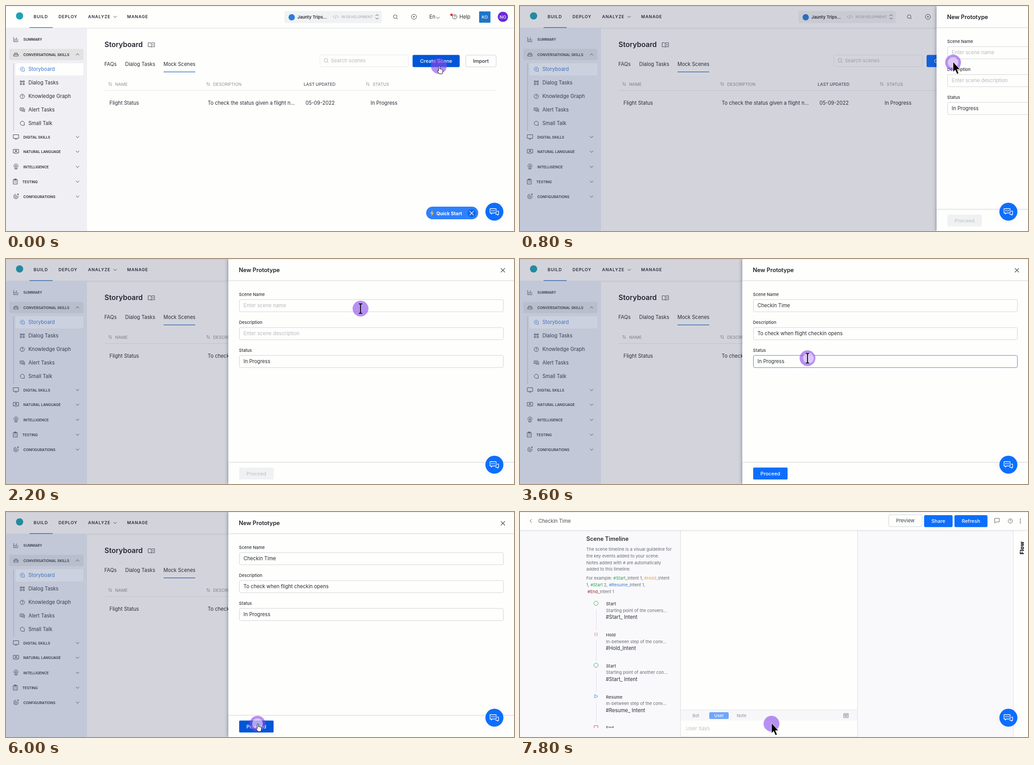
Animation, 1122 px wide and 499 px high, one loop 8 s. Source, as an HTML page with a canvas:

```html
<!DOCTYPE html>
<html lang="en">
<head>
<meta charset="utf-8">
<title>New scene</title>
<style>
html, body { margin: 0; width: 100%; height: 100%; overflow: hidden; background: #fefefd; }
canvas { display: block; width: 1122px; height: 499px; }
</style>
</head>
<body>
<canvas id="stage" width="1122" height="499"></canvas>
<script>
const c = document.getElementById('stage').getContext('2d');
const W = 1122, H = 499, LOOP = 8000, STEP = 200;
const WHITE = '#fefefd', INK = '#2a2d33', BLUE = '#0d6efd', DEEP = '#0056d8', GREY = '#8c9098', HINT = '#b6b9be';

// y is the middle of the capital letters
function text(s, x, y, size = 11.05, color = INK, weight = 400, gap = 0, font = 'Inter') {
  c.font = `${weight} ${size}px "${font}", sans-serif`;
  c.letterSpacing = gap + 'px';
  c.fillStyle = color;
  c.fillText(s, x, y + size * 0.364);
  return x + c.measureText(s).width;
}

function middle(s, x, y, size, color, weight) {
  c.textAlign = 'center';
  text(s, x, y, size, color, weight);
  c.textAlign = 'left';
}

function rect(x, y, w, h, color) {
  c.fillStyle = color;
  c.fillRect(x, y, w, h);
}

function box(x, y, w, h, r, fill, line) {
  c.beginPath();
  c.roundRect(x, y, w, h, r);
  if (fill) { c.fillStyle = fill; c.fill(); }
  if (line) { c.strokeStyle = line; c.lineWidth = 1; c.stroke(); }
}

function disc(x, y, r, fill, line) {
  c.beginPath();
  c.arc(x, y, r, 0, Math.PI * 2);
  if (fill) { c.fillStyle = fill; c.fill(); }
  if (line) { c.strokeStyle = line; c.lineWidth = 1; c.stroke(); }
}

function icon(d, x, y, color = '#3c4048', width = 1, fill) {
  const p = new Path2D(d);
  c.save();
  c.translate(x, y);
  c.lineJoin = 'round';
  if (fill) { c.fillStyle = fill; c.fill(p); }
  if (width) { c.strokeStyle = color; c.lineWidth = width; c.stroke(p); }
  c.restore();
}

function shadowed(blur, dx, dy, alpha, draw) {
  c.save();
  c.shadowColor = `rgba(30,40,70,${alpha})`;
  c.shadowBlur = blur;
  c.shadowOffsetX = dx;
  c.shadowOffsetY = dy;
  draw();
  c.restore();
}

const DOWN = 'M-3.5-1.8L0 1.8 3.5-1.8', UP = 'M-3.5 1.8L0-1.8 3.5 1.8';
const LENS = 'M3.5-.5A4 4 0 1 1-4.5-.5 4 4 0 1 1 3.5-.5M2.4 2.4L5 5';
const BUBBLE = 'M4.5 4.5H0A4.5 4.5 0 1 1 4.5 0Z';
const SORT = 'M-2 3.5V-3.5M-3.8-1.7L-2-3.5-.2-1.7M2-3.5V3.5M.2 1.7L2 3.5 3.8 1.7';
const CROSS = 'M-4.5-4.5L4.5 4.5M4.5-4.5L-4.5 4.5';
const ARROW = 'M0-1.5V21L4.8 16.6 8.8 25.6 12.4 24 8.5 15.2H15Z';
const BEAM = 'M-3.5-10.5H-1L0-9.5 1-10.5H3.5M0-9.5V9.5M-3.5 10.5H-1L0 9.5 1 10.5H3.5';
const HAND = 'M-.5 11V1.5C-.5-.5 2.2-.5 2.2 1.5V7C3 5.6 4.6 6 4.6 7.4 5.4 6.4 6.4 7 6.4 8 ' +
  '7.4 7.2 8.6 7.8 8.6 9.2 9 13 7.8 15 7.4 17.5H1C0 15-3 12.5-3 10.5-2.5 9-1.5 10-.5 11Z';

const sections = [
  ['SUMMARY', 74.5, 'M-5-5V5H5M-2 3V-1M1 3V-4M4 3V0'],
  ['CONVERSATIONAL SKILLS', 108, 'M-3-3H3V0H-3ZM-5 0H5V3.5H-5Z'],
  ['DIGITAL SKILLS', 291, 'M-6-5H6V3H-6ZM-2.5 5H2.5'],
  ['NATURAL LANGUAGE', 323.5, 'M-6-5H6V3H2L0 5-2 3H-6ZM-3 2.5C-3-.5 3-.5 3 2.5M1.5-2A1.5 1.5 0 1 1-1.5-2 1.5 1.5 0 1 1 1.5-2'],
  ['INTELLIGENCE', 357, 'M-2.5 5V2A4.5 4.5 0 1 1 2.5 2V5ZM1.5-1.5A1.5 1.5 0 1 1-1.5-1.5 1.5 1.5 0 1 1 1.5-1.5M0 0V4'],
  ['TESTING', 390, 'M-4.5-4.5H4.5V5.5H-4.5ZM-2-6H2V-3.5H-2ZM-2.5-1H-1M.5-1H2.5M-2.5 2H-1M.5 2H2.5'],
  ['CONFIGURATIONS', 423, 'M4-2L5 1 3 4 0 5-4 3.5-5 0-3.5-4 0-5M2 0A2 2 0 1 1-2 0 2 2 0 1 1 2 0M2-5H5.5M4-6.5L6-5 4-3.2']
];
const skills = [
  ['Storyboard', 140, BUBBLE + 'M-2-1H2M-2 1H1'],
  ['Dialog Tasks', 170, 'M-4.5-4H-1.5V-1H-4.5ZM1.5-4H4.5V-1H1.5ZM-4.5 1.5H-1.5V4.5H-4.5ZM1.5 1.5H4.5V4.5H1.5ZM-1.5-2.5H1.5'],
  ['Knowledge Graph', 200.4, 'M4.8 0A4.8 4.8 0 1 1-4.8 0 4.8 4.8 0 1 1 4.8 0M-1.3-1.2C-1.3-3 1.5-3 1.5-1.2 1.5 0 0 0 0 1.2M0 2.2V3'],
  ['Alert Tasks', 230, 'M-5-4H3V1H-2L-5 2ZM-2 3H2L5 4.5V-2M-3-1.5H1'],
  ['Small Talk', 260, BUBBLE]
];

function topBar() {
  shadowed(4, 0, 1, 0.14, () => rect(0, 0, W, 48, WHITE));
  rect(0, 0, W, 1, '#e7e8e8');
  disc(30, 22, 8, '#20a2b3');
  [['BUILD', 61], ['DEPLOY', 116], ['ANALYZE', 181.3], ['MANAGE', 267.5]]
    .forEach(([s, x]) => text(s, x, 23.5, 9.4, INK, 600, 0.8));
  icon(DOWN, 241, 24);
  rect(52, 47, 51, 1.5, '#3778c6');
  box(615, 11, 215, 27, 2, '#f1f2f4');
  disc(631, 25, 7, '#2b7ddd');
  text('Jaunty Trips...', 643.5, 24.5, 9.4, INK, 600);
  icon('M-3-3L-6 0-3 3M3-3L6 0 3 3M1-4L-1 4', 728.5, 24, '#a9adb5');
  text('IN DEVELOPMENT', 741, 24.5, 7.85, '#b4b8bf', 600);
  icon('M-3.5-2L0-5 3.5-2M-3.5 2L0 5 3.5 2', 819.5, 24);
  icon(LENS, 860, 24);
  disc(901, 24, 5.5, null, '#3c4048');
  disc(901, 24, 1.4, '#3c4048');
  text('En', 935, 24.4);
  icon(DOWN, 954, 26);
  icon(skills[2][2], 991, 24);
  disc(984, 19.5, 2.7, '#dc2f3e');
  text('Help', 1001.5, 24.4);
  box(1045, 12, 25, 25, 1, '#1f75c9');
  middle('KO', 1057.5, 24.5, 9.4, '#fff', 500);
  disc(1097.5, 24, 11.3, '#6c2bd9');
  middle('NO', 1097.5, 24.5, 9.4, '#fff', 500);
}

function sideBar() {
  rect(0, 49, 179, 450, '#f0f0f4');
  box(7, 95, 164, 25, 3, '#e2e2e3');
  rect(16, 127, 1.3, 150, '#c3c7d0');
  box(21, 127, 150, 27, 2, WHITE);
  sections.forEach(([s, y, d], i) => {
    icon(d, i === 5 ? 20.5 : 22, y - 0.5);
    text(s, i === 5 ? 36 : 38.3, y, 7.85, INK, 600);
    if (i) icon(i === 1 ? UP : DOWN, 158, y - 0.5);
  });
  skills.forEach(([s, y, d], i) => {
    const color = i ? INK : '#3673d2';
    icon(d, 36, y, color, 0.9);
    text(s, 49.4, y, 11.1, color);
  });
}

function sceneList(hover) {
  rect(0, 0, W, H, WHITE);
  topBar();
  sideBar();
  text('Storyboard', 217.5, 85, 15.6, '#202329', 600);
  icon('M0-3.5C-2-5-5-4.5-7-4.5V4.5C-5 4.5-2 4 0 5 2 4 5 4.5 7 4.5V-4.5C5-4.5 2-5 0-3.5ZM0-3.5V5M3.5-2V2', 321, 86);
  text('FAQs', 217.3, 129);
  text('Dialog Tasks', 263.2, 129);
  text('Mock Scenes', 347.7, 129);
  rect(348, 145.5, 70, 1.5, '#3c7cc9');
  box(693.5, 108.5, 195, 26, 3, WHITE, '#e4e6e9');
  icon(LENS, 707, 121, '#a8acb3');
  text('Search scenes', 717.5, 121, 11, HINT);
  box(898, 108.5, 104, 27, 3, hover ? DEEP : BLUE);
  middle('Create Scene', 950, 121.8, 11, '#fff', 500);
  box(1015.5, 109, 67, 26, 3, WHITE, '#d0d2d6');
  middle('Import', 1049, 121.8, 11, INK, 500);
  [['NAME', 230], ['DESCRIPTION', 446.5], ['STATUS', 799]].forEach(([s, x]) => {
    icon(SORT, x, 173, '#8d929a', 0.9);
    text(s, x + 11, 174, 9.4, GREY);
  });
  text('LAST UPDATED', 657.5, 174, 9.4, '#50545c', 500);
  rect(218, 187, 865, 1, '#e3e5e7');
  [['Flight Status', 228.6], ['To check the status given a flight n...', 445.4], ['05-09-2022', 661.4], ['In Progress', 805.2]]
    .forEach(([s, x]) => text(s, x, 215, 11.1));
  box(928, 445, 115, 28, 14, '#2f80fc');
  icon('M1-7L-4 1H-.5L-1.5 7 4-1.5H.5Z', 941, 459.5, '', 0, '#fbc02d');
  text('Quick Start', 950.5, 460, 10.4, '#fff', 700);
  disc(1028.5, 459.5, 9, '#0c67ea');
  icon(CROSS, 1028.5, 459.5, '#fff', 1.2);
}

function dim(k) {
  rect(0, 0, W, H, `rgba(40,45,80,${0.2 * k})`);
  rect(0, 49, 179, 450, `rgba(150,190,240,${0.12 * k})`);
}

function field(x, y, label, value, hint, focus) {
  text(label, x - 0.4, y - 24, 9.4, '#33363c', 500);
  box(x + 0.5, y - 13, 583, 27, 3, WHITE, focus ? '#4b82d4' : '#cfd2d6');
  text(value || hint, x + 9.6, y, 11.05, value ? INK : HINT);
}

function panel(x, s) {
  shadowed(7, -2, 0, 0.3, () => rect(x, 0, W - x + 10, H, WHITE));
  shadowed(3, 0, 1, 0.2, () => rect(x, 0, 640, 47, WHITE));
  shadowed(3, 0, -1, 0.2, () => rect(x, 452, 640, 47, WHITE));
  rect(x, 0, 640, 1, '#e7e8e8');
  text('New Prototype', x + 23.3, 24, 12.6, '#202329', 600);
  icon(CROSS, x + 606.5, 25, '#44484f', 1.1);
  const left = x + 24;
  field(left, 103, 'Scene Name', s.name, 'Enter scene name', s.focus === 1);
  field(left, 165, 'Description', s.about, 'Enter scene description', s.focus === 2);
  field(left, 226.8, 'Status', 'In Progress', '', s.focus === 3);
  box(left, 462.5, 76, 26.5, 2, s.about ? (s.hover ? DEEP : BLUE) : '#f0f1f2');
  middle('Proceed', left + 38, 476, 11, s.about ? '#fff' : '#c3c6cb', 500);
}

function blank(status) {
  box(0.5, 0.5, W - 1, H + 6, 3, WHITE, '#bfbfbf');
  if (!status) return;
  box(0, 480, 373, 19, [0, 3, 0, 0], '#4a4a48');
  text('Waiting for bots.kore.ai...', 4, 490, 9.3, '#fff', 400, 0, 'Open Sans');
}

const GREEN = '#2f9e58', PALE = '#666a70';
const events = [
  ['Start', 'Starting point of the convers...', '#Start_ Intent'],
  ['Hold', 'In-between step of the conv...', '#Hold_Intent'],
  ['Start', 'Starting point of another con...', '#Start_ Intent'],
  ['Resume', 'In-between step of the conv...', '#Resume_ Intent'],
  ['End', '', '']
];

function runs(x, y, parts) {
  for (const [s, color = PALE] of parts) x = text(s, x, y, 9.4, color);
}

function timeline() {
  text('Scene Timeline', 146.5, 59.5, 12.6, '#2d3036', 600);
  ['The scene timeline is a visual guideline for', 'the key events added to your scene.',
    'Notes added with # are automatically', 'added to this timeline.']
    .forEach((s, i) => text(s, 146.5, 82.3 + i * 14.9, 9.42, PALE));
  runs(146.5, 147, [['For example: '], ['#Start_', GREEN], ['Intent 1, '], ['#Hold_', '#e9a04a'], ['Intent']]);
  runs(146.5, 161.8, [['1, '], ['#Start', GREEN], [' 2, '], ['#Resume_', '#3c78d8'], ['Intent 1,']]);
  runs(149, 177, [['#End_', '#8a2f2a'], ['Intent 1']]);
  c.save();
  c.beginPath();
  c.rect(140, 190, 210, 289);
  c.clip();
  events.forEach(([name, about, tag], i) => {
    const y = 204 + i * 68.7;
    if (name === 'Start') disc(168, y - 1.5, 4.7, null, '#43a85e');
    if (name === 'Hold') icon('M-2.3-4V4M2.3-4V4', 168, y - 1.5, '#df7590', 1.1);
    if (name === 'Resume') icon('M-3-4L4 0-3 4Z', 168, y - 1.5, '#4c83dc');
    if (name === 'End') icon('M-4-4H4V4H-4Z', 168, y - 1, '#d6455d');
    if (about) rect(168, y + 12, 1, 46, '#dcdee2');
    text(name, 190, y, 9.4, '#55585e', 600);
    text(about, 190, y + 14.4, 9.42, PALE);
    text(tag, 189.5, y + 29.4, 11.1, INK);
  });
  c.restore();
}

function editor(loaded) {
  rect(0, 0, W, H, '#f9f9fb');
  rect(354, 40, 392, H, '#d9dbdf');
  rect(355, 40, 390, H, WHITE);
  rect(355, 438.5, 390, 1, '#d9dbdf');
  rect(355, 439.5, 390, 23, '#f7f7fa');
  rect(1089, 40, 33, H, '#dfe0e4');
  rect(1090, 40, 32, H, WHITE);
  shadowed(4, 0, 1, 0.16, () => rect(0, 0, W, 40, WHITE));
  rect(0, 0, W, 1, '#e7e8e8');
  icon('M2-4L-2 0 2 4', 24, 20, '#55595f');
  text('Checkin Time', 40.5, 20, 11.05, '#4a4d53');
  box(814.5, 6, 73.5, 26.5, 3, WHITE, '#d0d2d6');
  middle('Preview', 851, 19, 11, '#3c3f45', 400);
  box(892.5, 7, 63, 26.5, 3, BLUE);
  middle('Share', 924, 20, 11, '#fff', 500);
  box(959.5, 7, 73, 26.5, 3, BLUE);
  middle('Refresh', 996, 20, 11, '#fff', 500);
  icon('M-5-5H5V3H-2L-5 5.5Z', 1053.5, 19, '#5f5a62');
  icon(skills[2][2], 1083, 20, '#55595f', 0.9);
  for (const y of [16, 20, 24]) disc(1105, y, 1.1, '#3c4048');
  c.save();
  c.translate(1108.5, 94);
  c.rotate(-Math.PI / 2);
  text('Flow', 0, 0, 12.2, '#16181c', 800);
  c.restore();
  text('Bot', 381, 452, 9.4, GREY);
  box(418, 444, 43, 15, 3, '#6fa6fb');
  middle('User', 439.5, 452, 9.4, '#fff', 500);
  text('Note', 478.8, 452, 9.4, GREY);
  icon('M-5-4.5H5V4.5H-5ZM-5-2H5M-3 0H3M-3 2H3', 720, 451.5, '#7c8088');
  text('User Says', 366.5, 480, 11, '#bdc0c5');
  rect(355, 497.5, 390, 1, '#e3e5e8');
  if (loaded) timeline();
}

function chat() {
  shadowed(18, 0, 2, 0.04, () => disc(1078.7, 456.2, 19.9, BLUE));
  icon('M-9-6.5H4.5V3H-3.5L-6 5.5V3H-9ZM6.5-1H10V6H8.5V8L6 6H3', 1078, 456, '#fff', 1.3);
  for (const dx of [-5.5, -2.3, 0.9]) disc(1078 + dx, 454.2, 1.1, '#fff');
}

function pointer(kind, x, y, press) {
  disc(x, y, 17.5, 'rgba(139,72,236,.6)');
  if (press) disc(x + (kind === 'beam' ? 2 : 0), y, 11.7, 'rgba(255,255,255,.52)');
  if (kind === 'arrow') icon(ARROW, x, y, '#fff', 0.8, '#000');
  if (kind === 'beam') icon(BEAM, x, y, '#000', 1.8);
  if (kind === 'hand') icon(HAND, x, y, '#111', 1, '#fff');
}

const mix = (a, b, k) => a + (b - a) * Math.min(1, Math.max(0, k));
const smooth = k => k * k * (3 - 2 * k);
const within = (t, a, b) => t >= a && t < b;

function place(t) {
  if (t < 200) return ['hand', 956, 133];
  if (t < 600) return ['hand', 956.5, 125];
  if (t < 2200) return ['arrow', 956.5, 125.3];
  if (t < 3200) return ['beam', 783, 110];
  if (t < 4400) {
    const k = mix(0, 1, (t - 3000) / 600);
    return ['beam', mix(783, 635, k), mix(110, 220, k)];
  }
  if (t < 6400) {
    const k = smooth(mix(0, 1, (t - 4200) / 1000));
    return [t < 5000 ? 'arrow' : 'hand', mix(635, 555.5, k), mix(220, 469.5, k)];
  }
  return ['arrow', 555.5, 469.5];
}

function draw(t) {
  c.clearRect(0, 0, W, H);
  if (t < 6400) {
    sceneList(t < 600);
    if (t >= 600) {
      dim(mix(0, 1, (t - 400) / 400));
      const slide = t < 800 ? W : t < 1000 ? 920 : t < 1200 ? 570 : 491;
      if (slide < W) panel(slide, {
        name: t >= 3200 ? 'Checkin Time' : '',
        about: t >= 3400 ? 'To check when flight checkin opens' : '',
        focus: within(t, 3000, 3400) ? 1 : within(t, 3400, 3600) ? 2 : within(t, 3600, 4400) ? 3 : 0,
        hover: t >= 5000
      });
    }
  } else if (t < 7200) blank(t < 7000);
  else editor(t >= 7400);
  chat();
  const press = within(t, 400, 1400) || within(t, 3000, 3200) || within(t, 3600, 3800) || within(t, 6000, 6600);
  pointer(...place(t), press);
}

function tick(now) {
  draw(Math.floor((now % LOOP) / STEP) * STEP);
  requestAnimationFrame(tick);
}
requestAnimationFrame(tick);
</script>
</body>
</html>
```
